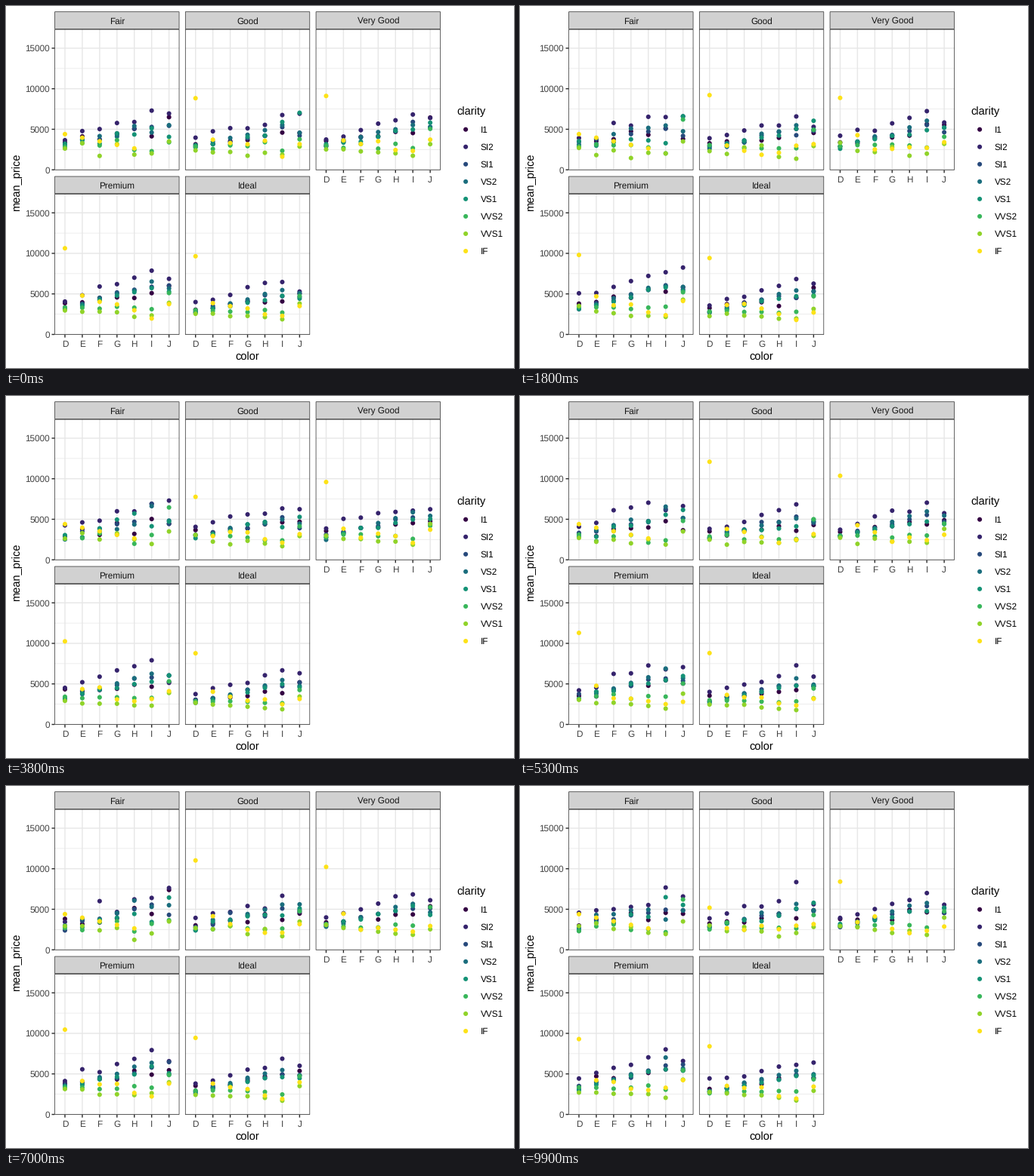
A matplotlib script for the animation above (10000 ms loop, 672 px wide and 480 px high).

```python
import numpy as np
import matplotlib.pyplot as plt
from matplotlib.animation import FuncAnimation
from matplotlib.patches import Rectangle

plt.rcParams["font.family"] = "Liberation Sans"
plt.rcParams["text.hinting"] = "none"

W, H, DPI = 672, 480, 96
PX = 72 / DPI
FRAMES, INTERVAL = 100, 100

CUTS = ["Fair", "Good", "Very Good", "Premium", "Ideal"]
COLORS = "DEFGHIJ"
CLARITY = ["I1", "SI2", "SI1", "VS2", "VS1", "VVS2", "VVS1", "IF"]
PALETTE = plt.get_cmap("viridis")(np.linspace(0, 1, 8))[:, :3] ** 1.22
STRIP, GRID, LINE = "#d1d1d1", "#e7e7e7", "#2b2b2b"
AXIS_TEXT, STRIP_TEXT = "#444444", "#141414"

# ---- price model ----
# mean price at colors D, I and J; straight lines between
KEY_PRICES = {
    "I1": (3400, 4500, 5000),
    "SI2": (3950, 6900, 6100),
    "SI1": (3000, 5250, 5000),
    "VS2": (2800, 5700, 5100),
    "VS1": (2900, 5000, 4900),
    "VVS2": (3000, 2900, 4800),
    "VVS1": (2700, 1950, 3500),
    "IF": (4400, 2200, 3300),
}
CUT_FACTOR = [1.0, .96, 1.0, 1.12, .96]
CUT_SIZE = [1600, 4900, 12100, 13800, 21500]
D_IF_PREMIUM = 4800

rng = np.random.default_rng(21)


def group_mean(k, j, c):
    price = np.interp(j, (0, 5, 6), KEY_PRICES[CLARITY[c]])
    if k > 0 and j == 0 and CLARITY[c] == "IF":
        price += D_IF_PREMIUM
    return price * CUT_FACTOR[k]


def group_size(k, j, c):
    """Better cuts lean towards clearer stones; middle colors are common."""
    clarity_share = np.exp(-((c - 1.8 - .45 * k) / 1.8) ** 2 / 2) / 4.5
    color_share = .2 * np.exp(-((j - 2.3) / 3) ** 2)
    return round(CUT_SIZE[k] * clarity_share * color_share)


def bootstrap_means(n, mean):
    """Resampled means, one per draw, of n skewed prices."""
    prices = rng.lognormal(0, .65, n)
    prices *= mean / prices.mean()
    pick = rng.integers(0, n, (FRAMES, n))
    return np.clip(prices[pick].mean(axis=1), 650, 16500)


# ---- layout in pixels ----
PANEL_W, PANEL_H, STRIP_H = 165.2, 186.85, 23.4
STEP = PANEL_W / 7.2
PER_UNIT = 53.75 / 5000


def panel_pos(k):
    return 64.2 + 172.75 * (k % 3), 30.75 + 218.3 * (k // 3)


def x_of(left, j):
    return left + STEP * (.6 + j)


def y_of(top, value):
    return top + PANEL_H - .4 - value * PER_UNIT


fig = plt.figure(figsize=(W / DPI, H / DPI), dpi=DPI, facecolor="white")
ax = fig.add_axes([0, 0, 1, 1])
ax.set(xlim=(0, W), ylim=(H, 0))
ax.axis("off")


def line(xs, ys, color, width, z=1):
    ax.plot(xs, ys, color=color, lw=width * PX, zorder=z, snap=False,
            solid_capstyle="butt")


def box(x, y, w, h, fill, z):
    """Rectangle whose outline stays inside its bounds."""
    ax.add_patch(Rectangle((x + .36, y + .36), w - .72, h - .72, fc=fill,
                           ec=LINE, lw=.72 * PX, zorder=z, snap=False))


def label(x, y, text, size=8.8, color="black", ha="center", rotation=0):
    ax.text(x, y, text, fontsize=size, color=color, ha=ha, va="baseline",
            rotation=rotation, rotation_mode="anchor", zorder=6)


def draw_panel(k):
    left, top = panel_pos(k)
    right, bottom = left + PANEL_W, top + PANEL_H
    for v in (2500, 7500, 12500):
        line([left, right], [y_of(top, v)] * 2, GRID, .71)
    for v in (0, 5000, 10000, 15000):
        y = y_of(top, v)
        line([left, right], [y, y], GRID, 1.42)
        if k % 3 == 0:
            line([left - 3.7, left], [y, y], LINE, 1.42)
            label(left - 6.4, y + 4.2, str(v), color=AXIS_TEXT, ha="right")
    for j, name in enumerate(COLORS):
        x = x_of(left, j)
        line([x, x], [top, bottom], GRID, 1.42)
        if k >= 2:
            line([x, x], [bottom, bottom + 3.7], LINE, 1.42)
            label(x, bottom + 16.4, name, color=AXIS_TEXT)
    box(left, top - STRIP_H, PANEL_W, STRIP_H, STRIP, 2)
    box(left, top, PANEL_W, PANEL_H, "none", 5)
    label(left + PANEL_W / 2, top - 6.8, CUTS[k], color=STRIP_TEXT)


def dots_at(x, y, colors):
    return ax.scatter(x, y, c=colors, s=(6.05 * PX) ** 2, linewidths=0,
                      zorder=4, snap=False)


for k in range(len(CUTS)):
    draw_panel(k)

label(319.6, 469.7, "color", 11)
label(17.6, 233.5, "mean_price", 11, rotation=90)

label(596.5, 144, "clarity", 11, ha="left")
key_y = 163.7 + 23.04 * np.arange(len(CLARITY))
dots_at([608.1] * len(key_y), key_y, PALETTE)
for name, y in zip(CLARITY, key_y):
    label(627.6, y + 4.2, name, ha="left")

# ---- points: a new bootstrap draw in every frame ----
xs, ys, hues = [], [], []
for k in range(len(CUTS)):
    left, top = panel_pos(k)
    for j in range(len(COLORS)):
        for c in range(len(CLARITY)):
            n = group_size(k, j, c)
            if n == 0:
                continue
            xs.append(x_of(left, j))
            ys.append(y_of(top, bootstrap_means(n, group_mean(k, j, c))))
            hues.append(PALETTE[c])
xs, ys = np.array(xs), np.array(ys)
dots = dots_at(xs, ys[:, 0], hues)


def update(i):
    dots.set_offsets(np.column_stack([xs, ys[:, i]]))
    return (dots,)


anim = FuncAnimation(fig, update, frames=FRAMES, interval=INTERVAL,
                     repeat=True, repeat_delay=0)
plt.show()
```
